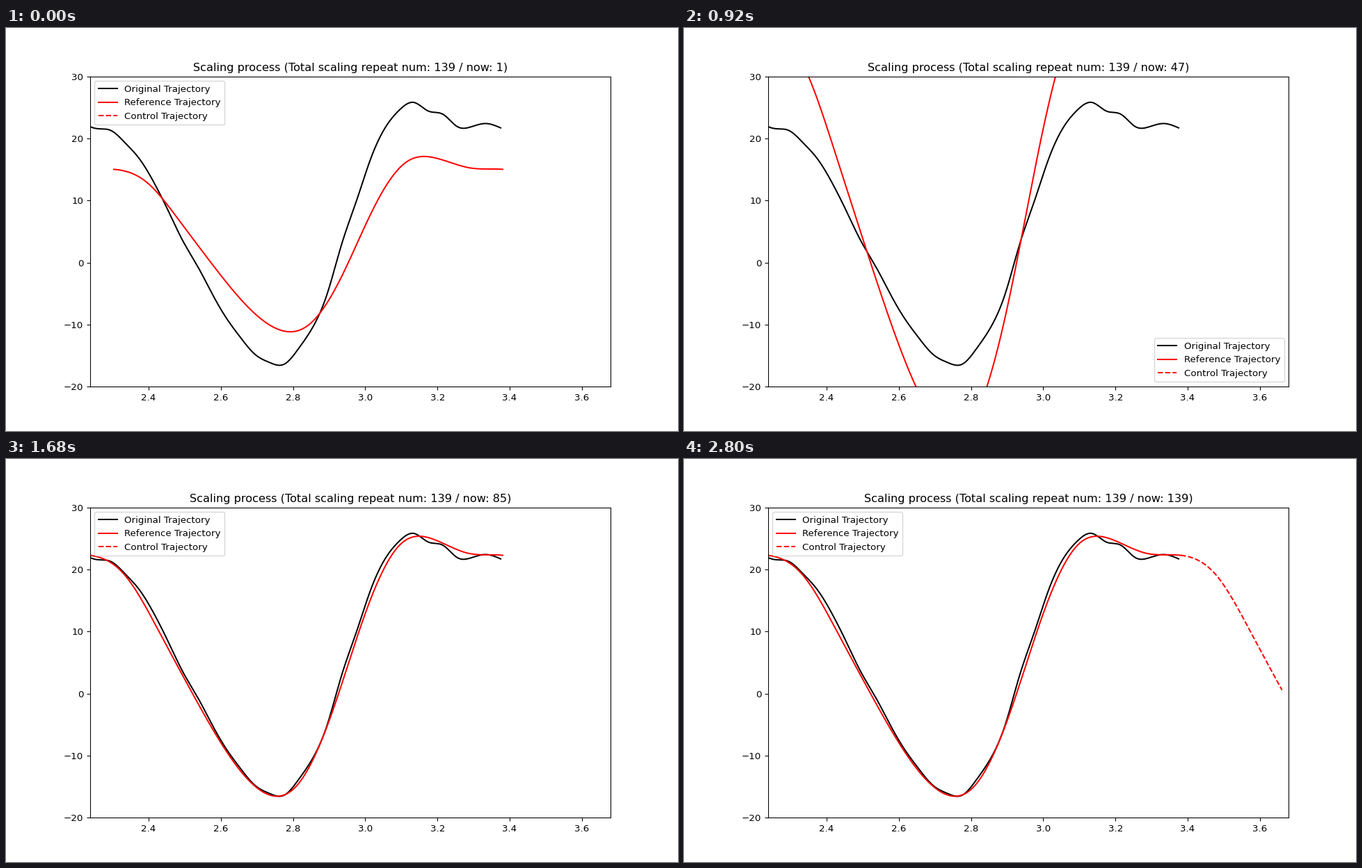
A matplotlib script that plays this animation: 966x580 px, repeating every 3.4 s.

```python
import numpy as np
import matplotlib.pyplot as plt
from matplotlib.animation import FuncAnimation

W, H, DPI = 966, 580, 96.6
STEP_MS, FRAMES, TOTAL = 40, 85, 139

# Measured angle, one key value every SIGNAL_DT seconds.
SIGNAL_T0, SIGNAL_DT = 2.215, 0.04
SIGNAL = [22.6, 21.6, 21.3, 19.3, 16.7, 12.9, 8.3, 3.5, -0.5, -4.9,
          -8.9, -12.1, -14.8, -16.1, -16.4, -13.9, -10.4, -5.0, 3.0, 9.8,
          16.7, 21.7, 24.6, 25.8, 24.4, 23.9, 21.9, 21.9, 22.4, 21.7]

# Reference gait cycle at twelve equal phases; it repeats after CYCLE seconds.
GAIT = [15.02, 13.0, 6.9, -0.03, -6.4, -10.6, -10.1, -2.56, 8.6, 16.1, 16.75, 15.24]
CYCLE, CYCLE_END = 1.0767, 3.3807
CONTROL_PHASE = 0.245

# Each pass searches the time scale, then the amplitude scale. A search
# brackets the minimum, takes two golden section steps, then settles.
PROBES = [0, 1, -1.618, 0, -0.618, 0.382]
SEARCH_STARTS = [2, 19, 29, 46, 56, 74, 110, 128]
BEST = [1.063, 1.483]
FIRST_TIME = 1.052


def spline(y, s):
    """Natural cubic spline through y at 0, 1, 2, ..., evaluated at s."""
    n = len(y)
    a = 4 * np.eye(n - 2) + np.eye(n - 2, k=1) + np.eye(n - 2, k=-1)
    m = np.zeros(n)
    m[1:-1] = np.linalg.solve(a, 6 * np.diff(y, 2))
    i = np.clip(s.astype(int), 0, n - 2)
    r = s - i
    l = 1 - r
    return (l * y[i] + r * y[i + 1]
            + ((l**3 - l) * m[i] + (r**3 - r) * m[i + 1]) / 6)


def gait(phase):
    """Reference angle at a phase counted in cycles."""
    n = len(GAIT)
    return spline(np.tile(GAIT, 3), n + phase % 1 * n)


def scales(now):
    """Time and amplitude scale tried at the given evaluation."""
    value = [1.0, 1.0]
    for i, first in enumerate(SEARCH_STARTS):
        step = now - first
        if step < 0:
            break
        param = i % 2
        if step < len(PROBES):
            value[param] += PROBES[step]
        else:
            value[param] = FIRST_TIME if i == 0 else BEST[param]
    return value


knots = np.linspace(0, len(SIGNAL) - 1, 500)
phase = np.linspace(0, 1, 300)
ref_angle = gait(phase)
next_phase = np.linspace(0, CONTROL_PHASE, 80)
next_angle = gait(next_phase)

# The small margin keeps the pixel size from being rounded down.
fig, ax = plt.subplots(figsize=((W + 1e-6) / DPI, (H + 1e-6) / DPI), dpi=DPI)
ax.plot(SIGNAL_T0 + SIGNAL_DT * knots, spline(np.array(SIGNAL), knots),
        "k-", label="Original Trajectory")
reference, = ax.plot([], [], "r-", label="Reference Trajectory")
control, = ax.plot([], [], "r--", label="Control Trajectory")
ax.set_xlim(2.238, 3.68)
ax.set_ylim(-20, 30)
ax.legend(loc="best")
title = ax.set_title("")


def update(i):
    now = min(1 + 2 * i, TOTAL)
    time, amp = scales(now)
    reference.set_data(CYCLE_END + time * CYCLE * (phase - 1), amp * ref_angle)
    if 1 + 2 * i > TOTAL:
        control.set_data(CYCLE_END + time * CYCLE * next_phase, amp * next_angle)
    else:
        control.set_data([], [])
    title.set_text(f"Scaling process (Total scaling repeat num: {TOTAL} / now: {now})")
    return reference, control, title


anim = FuncAnimation(fig, update, frames=FRAMES, interval=STEP_MS,
                     repeat=True, repeat_delay=0, blit=False)
plt.show()
```
